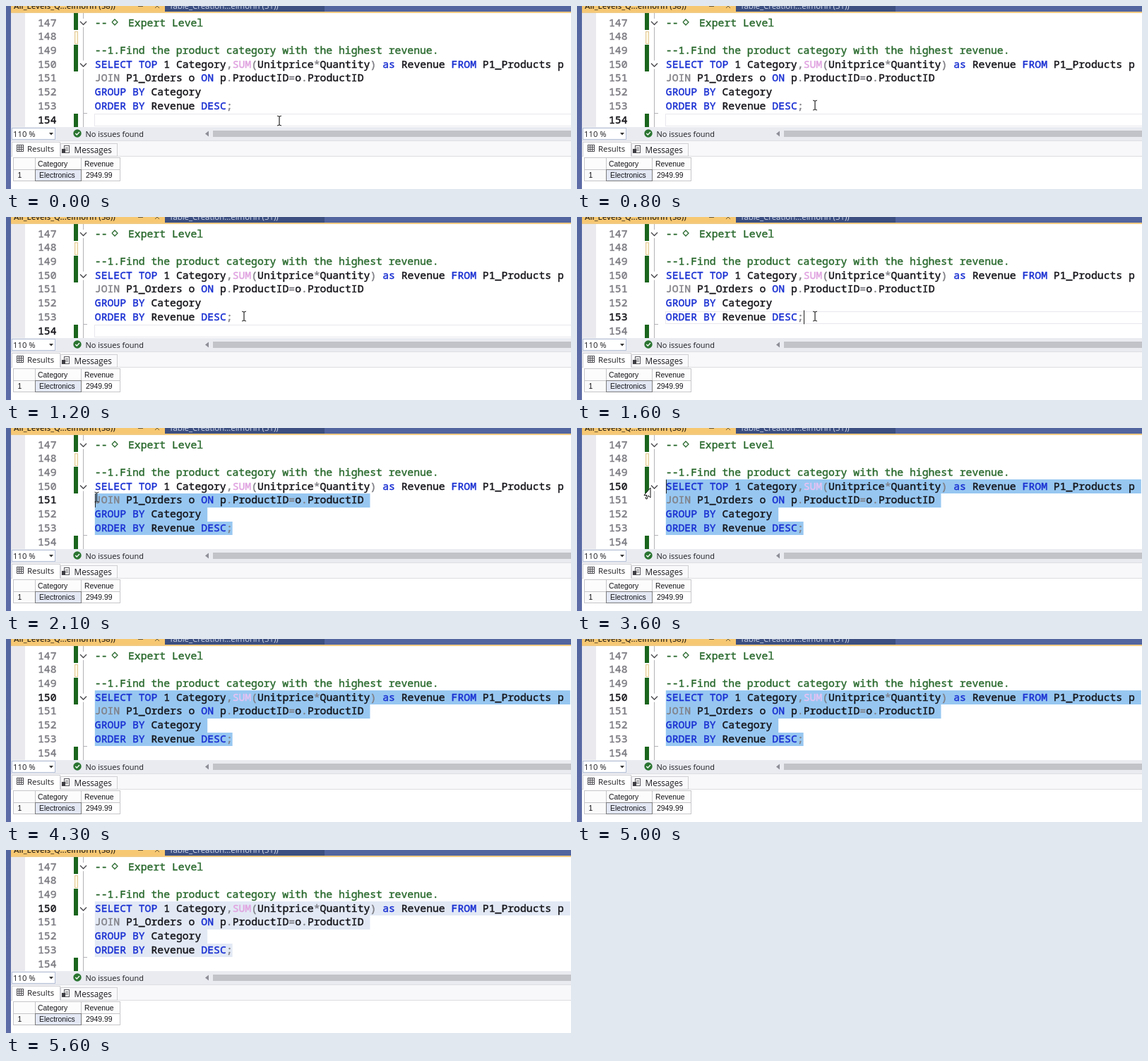
An HTML page with a canvas that plays this animation: 800x260 px, repeating every 5.7 s.

```html
<!DOCTYPE html>
<html lang="en">
<head>
<meta charset="utf-8">
<title>Query editor</title>
<style>
html, body { margin: 0; width: 800px; height: 260px; overflow: hidden; background: #fff; }
canvas { display: block; }
</style>
</head>
<body>
<canvas id="stage" width="800" height="260"></canvas>
<script>
const ctx = document.getElementById('stage').getContext('2d');
const LOOP = 5700;
const FIRST = 147, TOP = 14.2, ROW = 19.72, BASE = 14.4, LEFT = 125.8, CHAR = 8.856;
const CODE = '500 14.76px "Noto Sans Mono", "DejaVu Sans Mono", monospace';
const UI = '"Open Sans", "Noto Sans", sans-serif';
const GRID = '10.4px "Liberation Sans", Arial, sans-serif';
const INK = '#15151a', BLUE = '#1a30d2', GREEN = '#2a6a2e', GRAY = '#808087', PINK = '#e0a4e0';

// One character before each piece of text gives its colour.
const COLORS = { k: BLUE, i: INK, g: GREEN, o: GRAY, f: PINK };
const SOURCE = [
  ['g--'],
  [],
  ['g--1.Find the product category with the highest revenue.'],
  ['kSELECT TOP ', 'i1 Category', 'o,', 'fSUM', 'o(', 'iUnitprice', 'o*', 'iQuantity', 'o)', 'k as ',
    'iRevenue ', 'kFROM ', 'iP1_Products p'],
  ['oJOIN ', 'iP1_Orders o ', 'kON ', 'ip', 'o.', 'iProductID', 'o=', 'io', 'o.', 'iProductID'],
  ['kGROUP BY ', 'iCategory'],
  ['kORDER BY ', 'iRevenue ', 'kDESC', 'o;'],
  []
];
const LENGTHS = SOURCE.map(line => line.reduce((n, part) => n + part.length - 1, 0));
const QUERY = { first: 3, last: 6 };

const CLICK = 1300, DRAG = 1750, RELEASE = 2200, BLUR = 5200;
const MOUSE = [
  [0, 387, 163], [150, 387, 163], [650, 337, 141], [DRAG, 337, 141],
  [RELEASE, 99, 92], [3700, 99, 92], [4150, 112, -20], [LOOP, 112, -20]
];

const clamp = (v, lo, hi) => Math.max(lo, Math.min(hi, v));
const rowTop = row => TOP + row * ROW;

function rect(x, y, w, h, color) {
  ctx.fillStyle = color;
  ctx.fillRect(x, y, w, h);
}

function frame(x, y, w, h, color) {
  ctx.strokeStyle = color;
  ctx.lineWidth = 1;
  ctx.strokeRect(x + 0.5, y + 0.5, w - 1, h - 1);
}

function text(str, x, y, font, color) {
  ctx.font = font;
  ctx.fillStyle = color;
  ctx.fillText(str, x, y);
}

// Editor text is slightly heavier than the regular weight.
function mono(str, x, row, color) {
  const y = rowTop(row) + BASE;
  text(str, x, y, CODE, color);
  ctx.strokeStyle = color;
  ctx.lineWidth = 0.45;
  ctx.strokeText(str, x, y);
}

function path(points, stroke, fill, width = 1) {
  ctx.beginPath();
  points.forEach(([x, y], i) => i ? ctx.lineTo(x, y) : ctx.moveTo(x, y));
  if (fill) {
    ctx.closePath();
    ctx.fillStyle = fill;
    ctx.fill();
  }
  if (stroke) {
    ctx.strokeStyle = stroke;
    ctx.lineWidth = width;
    ctx.stroke();
  }
}

function mouseAt(t) {
  let i = 1;
  while (i < MOUSE.length - 1 && t > MOUSE[i][0]) i++;
  const [t0, x0, y0] = MOUSE[i - 1], [t1, x1, y1] = MOUSE[i];
  const u = clamp((t - t0) / (t1 - t0), 0, 1), e = u * u * (3 - 2 * u);
  return { x: x0 + (x1 - x0) * e, y: y0 + (y1 - y0) * e };
}

function caretAt(t, mouse) {
  if (t < CLICK) return { row: 7, col: 0 };
  if (t < DRAG) return { row: QUERY.last, col: LENGTHS[QUERY.last] };
  if (t >= RELEASE) return { row: QUERY.first, col: 0 };
  const row = clamp(Math.floor((mouse.y - TOP) / ROW), QUERY.first, QUERY.last);
  return { row, col: clamp(Math.round((mouse.x - LEFT) / CHAR), 0, LENGTHS[row]) };
}

function caretShown(t) {
  if (t >= BLUR) return false;
  if (t >= DRAG && t < RELEASE) return true;
  const start = t < CLICK ? 200 : t < DRAG ? CLICK : RELEASE;
  return t >= start && Math.floor((t - start) / 530) % 2 === 0;
}

function tabs() {
  rect(0, 0, 800, 10, '#52659f');
  rect(225, 0, 226, 8, '#3c4f80');
  rect(7, 0, 218, 10, '#f7c872');
  rect(7, 8, 793, 2, '#f1c981');
  text('All_Levels_Q...elmorin (58))', 11, 3.5, '600 11.3px ' + UI, '#33291a');
  text('Table_Creation...elmorin (51))', 231, 3.5, '11.4px ' + UI, '#d6dcec');
  path([[187, 0.5], [194, 0.5]], '#6b5a38');
  path([[211, 3], [214, 0], [217, 3]], '#6b5a38');
}

function gutter(current) {
  rect(7, 10, 20, 162, '#e9e9ee');
  for (let row = 0; row < SOURCE.length; row++) {
    mono(String(FIRST + row), 45, row, row === current ? INK : '#7b7b82');
  }
  const mark = '#1a651d';
  rect(96, 10, 6, 24, mark);
  rect(97, 36, 5, 18, '#fff7e2');
  frame(97, 36, 5, 18, '#e2c792');
  rect(96, 55, 6, 38, mark);
  rect(96, 153, 6, 19, mark);

  rect(109, 10, 1, 162, '#b4b4b8');
  rect(109, 152, 6, 1, '#b4b4b8');
  for (const y of [24, 83.5]) {
    rect(104, y - 6, 11, 12, '#fff');
    path([[105, y - 2], [109.5, y + 2.5], [114, y - 2]], '#45454a', null, 1.3);
  }
}

function selection(caret, color) {
  for (let row = caret.row; row <= QUERY.last; row++) {
    const from = LEFT + (row === caret.row ? caret.col * CHAR : 0);
    let to = LEFT + LENGTHS[row] * CHAR;
    if (row < QUERY.last) to += CHAR;
    const y = Math.round(rowTop(row));
    rect(from, y, Math.max(0, to - from), Math.round(rowTop(row + 1)) - y, color);
  }
}

function code(caret, selected, focused) {
  SOURCE.forEach((line, row) => {
    let col = 0;
    for (const part of line) {
      const inside = part[0] === 'f' && selected && focused && caret.row === row && caret.col <= col;
      mono(part.slice(1), LEFT + col * CHAR, row, inside ? '#e6c2f3' : COLORS[part[0]]);
      col += part.length - 1;
    }
  });
  path([[150, 23], [154, 19], [158, 23], [154, 27], [150, 23]], GREEN, null, 1.3);
  mono('Expert Level', 173, 0, GREEN);
}

function pointer({ x, y }) {
  if (x > 122) {
    path([[x - 3, y - 7], [x, y - 6], [x + 3, y - 7]], '#222');
    path([[x - 3, y + 7], [x, y + 6], [x + 3, y + 7]], '#222');
    path([[x, y - 6], [x, y + 6]], '#222', null, 1.2);
    return;
  }
  const shape = [[5, -7], [5, 7], [2, 4], [0, 9], [-2, 8], [0, 3.5], [-4, 3.5], [5, -7]];
  path(shape.map(([dx, dy]) => [x + dx, y + dy]), '#111', '#fff');
}

function statusBar() {
  rect(7, 172, 793, 19, '#e9ebf1');
  rect(8, 173, 62, 17, '#fff');
  frame(8, 173, 62, 17, '#b3bfd6');
  text('110 %', 10, 186, '11.3px ' + UI, '#1c1c20');
  path([[61, 180], [67, 180], [64, 183.5]], null, '#333');
  ctx.beginPath();
  ctx.arc(101, 181, 5.7, 0, 7);
  ctx.fillStyle = '#2a7430';
  ctx.fill();
  path([[98.3, 181], [100.3, 183], [104, 179]], '#fff', null, 1.3);
  text('No issues found', 112.4, 186, '11px ' + UI, '#1c1c20');
  path([[287, 177.5], [287, 185.5], [282, 181.5]], null, '#8d8e96');
  rect(293, 177, 507, 9, '#c2c3c9');
}

function results() {
  rect(7, 191, 793, 69, '#f8f8fa');
  rect(7, 191, 793, 1, '#dcdee5');
  rect(7, 213, 793, 47, '#fff');
  rect(7, 213, 793, 1, '#dcdce0');
  rect(8, 193, 69, 21, '#fff');
  frame(8, 193, 69, 21, '#d0d0d4');
  rect(9, 212, 67, 3, '#fff');
  rect(77, 195, 81, 18, '#f9f9fb');
  frame(77, 195, 81, 19, '#d0d0d4');

  for (const d of [0, 3, 6, 9]) {
    rect(15 + d, 197, 1, 10, '#4a4a50');
    rect(15, 197 + d, 10, 1, '#4a4a50');
  }
  text('Results', 30, 207, '11.4px ' + UI, '#1c1c20');

  rect(82, 198, 8, 11, '#fff');
  frame(82, 198, 8, 11, '#55555a');
  for (const y of [201, 203, 205]) rect(84, y, 4, 1, '#77777c');
  rect(79, 203, 5, 6, '#3e3e44');
  text('Messages', 96.6, 209, '11.7px ' + UI, '#1c1c20');

  rect(10, 215, 152, 17, '#fcfcfc');
  rect(10, 232, 31, 16, '#fafafa');
  rect(41, 232, 66, 16, '#e3e8f4');
  for (const y of [215, 232, 248]) rect(10, y, 152, 1, '#c6c6ca');
  for (const x of [10, 41, 106, 161]) rect(x, 215, 1, 34, '#c6c6ca');
  ctx.setLineDash([1, 1]);
  frame(41, 232, 66, 17, '#333');
  ctx.setLineDash([]);
  text('Category', 45, 228, GRID, INK);
  text('Revenue', 111, 228, GRID, INK);
  text('1', 16.6, 244, GRID, INK);
  text('Electronics', 47, 244, GRID, INK);
  text('2949.99', 113, 244, GRID, INK);
}

function draw(t) {
  const mouse = mouseAt(t), caret = caretAt(t, mouse);
  const selected = t > DRAG, focused = t < BLUR;

  rect(0, 0, 800, 260, '#fff');
  tabs();
  gutter(caret.row);
  if (selected) selection(caret, focused ? '#97c7f1' : '#e2e9f5');
  else frame(125, Math.round(rowTop(caret.row)) + 1, 676, 18, '#e8e8ee');
  code(caret, selected, focused);
  if (caretShown(t)) rect(Math.round(LEFT + caret.col * CHAR), rowTop(caret.row), 1, ROW, '#222');
  statusBar();
  results();

  const side = ctx.createLinearGradient(0, 0, 0, 260);
  side.addColorStop(0, '#52659f');
  side.addColorStop(1, '#5d6ca6');
  rect(0, 0, 7, 260, side);
  pointer(mouse);
}

const start = performance.now();
function tick() {
  draw((performance.now() - start) % LOOP);
  requestAnimationFrame(tick);
}
tick();
</script>
</body>
</html>
```
